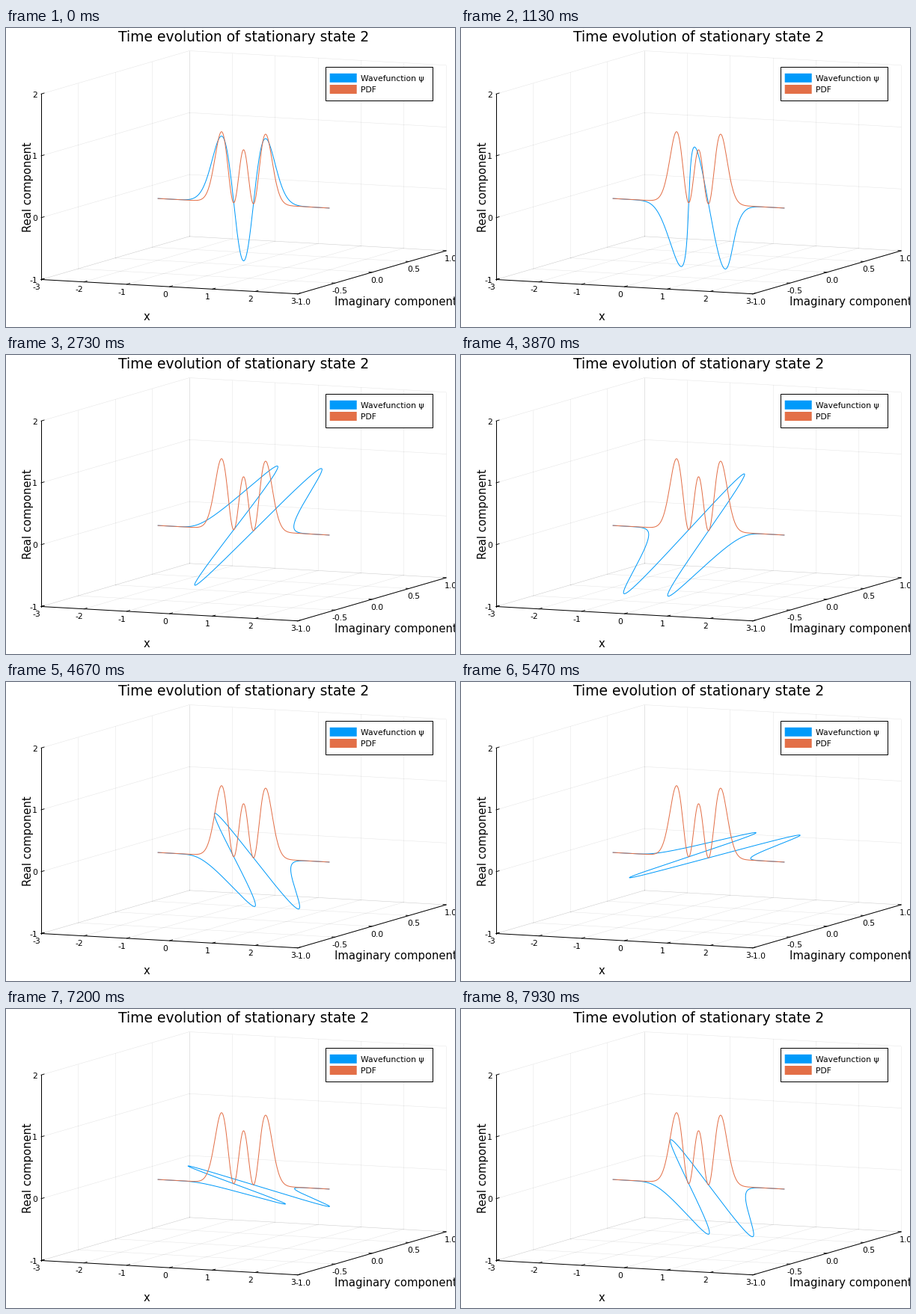
A matplotlib script for the animation above (8 s loop, 600 by 400 pixels).

```python
import numpy as np
import matplotlib.pyplot as plt
from matplotlib.animation import FuncAnimation
from matplotlib.patches import Rectangle

W, H = 600, 400
TICK_MS, LOOP = 20, 8000
BLUE, ORANGE = "#009AFA", "#E36F47"
TITLE, LABEL, SMALL = 18.8, 14.8, 10.76
ENERGY, FPS = 25, 15
ALPHA = 3.07  # inverse oscillator length

plt.rcParams["font.family"] = "DejaVu Sans"
fig = plt.figure(figsize=(W / 72, H / 72), dpi=72, facecolor="white")
ax = fig.add_axes([0, 0, 1, 1])
ax.set_xlim(0, W)
ax.set_ylim(H, 0)
ax.axis("off")


def project(x, im, re):
    """Orthographic view: (x, imaginary, real) to stage pixels."""
    return (317.5 + 57.17 * x + 99 * im,
            234.5 + 3.2 * x - 28.85 * im - 82.75 * re)


def segment(a, b, **style):
    (x0, y0), (x1, y1) = project(*a), project(*b)
    ax.plot([x0, x1], [y0, y1], **style)


def label(x, y, text, size=SMALL, ha="center"):
    ax.text(x, y, text, fontsize=size, ha=ha, va="baseline", zorder=8)


def tick(point, dx, dy):
    x, y = project(*point)
    ax.plot([x, x + dx], [y, y + dy], color="black", lw=0.9, zorder=2)
    return x, y


xs, ims, res = range(-3, 4), (-1, -0.5, 0, 0.5, 1), (-1, 0, 1, 2)

# Grid on the floor, the left wall and the back wall
grid = dict(color="black", alpha=0.1, lw=0.55, zorder=1)
for x in xs:
    segment((x, -1, -1), (x, 1, -1), **grid)
    segment((x, 1, -1), (x, 1, 2), **grid)
for im in ims:
    segment((-3, im, -1), (3, im, -1), **grid)
    segment((-3, im, -1), (-3, im, 2), **grid)
for re in res:
    segment((-3, -1, re), (-3, 1, re), **grid)
    segment((-3, 1, re), (3, 1, re), **grid)

# Axes, ticks and tick labels
axis = dict(color="black", lw=1, zorder=2, solid_capstyle="projecting")
segment((-3, -1, -1), (-3, -1, 2), **axis)
segment((-3, -1, -1), (3, -1, -1), **axis)
segment((3, -1, -1), (3, 1, -1), **axis)
for x in xs:
    px, py = tick((x, -1, -1), 4, -1.2)
    label(px - 6, py + 13.6, str(x))
for im in ims:
    px, py = tick((3, im, -1), -4, -0.3)
    label(px + 6.5, py + 14, f"{im:.1f}")
for re in res:
    px, py = tick((-3, -1, re), 4, -1.2)
    label(42, py + 4.3, str(re), ha="right")

label(318, 18, "Time evolution of stationary state 2", TITLE)
label(187.7, 391, "x", LABEL)
label(438.8, 371.5, "Imaginary component", LABEL, ha="left")
ax.text(29.5, 212.5, "Real component", fontsize=LABEL, rotation=90,
        ha="center", va="center", zorder=8)

# Legend
ax.add_patch(Rectangle((426.5, 51.5), 143.5, 45.5, fc="white", ec="black",
                       lw=1, zorder=6))
for y, color, name in ((60.8, BLUE, "Wavefunction ψ"), (76, ORANGE, "PDF")):
    ax.add_patch(Rectangle((432.7, y), 36, 12, fc=color, ec="none",
                           snap=False, zorder=7))
    label(474.3, y + 10.3, name, ha="left")

# Second excited state of the harmonic oscillator
x = np.linspace(-2, 2, 401)
xi = ALPHA * x
psi = np.sqrt(ALPHA / (8 * np.sqrt(np.pi))) * (4 * xi**2 - 2) * np.exp(-xi**2 / 2)

wave, = ax.plot([], [], color=BLUE, lw=1, zorder=4)
ax.plot(*project(x, 0, psi**2), color=ORANGE, lw=1, zorder=5)


def update(i):
    # Hold each pose for 1/15 s on the 20 ms clock
    step = (3 * i + 2) // 10
    phase = -ENERGY * step / FPS
    wave.set_data(*project(x, psi * np.sin(phase), psi * np.cos(phase)))
    return wave,


anim = FuncAnimation(fig, update, frames=LOOP // TICK_MS, interval=TICK_MS,
                     repeat=True, repeat_delay=0, blit=False)
plt.show()
```
